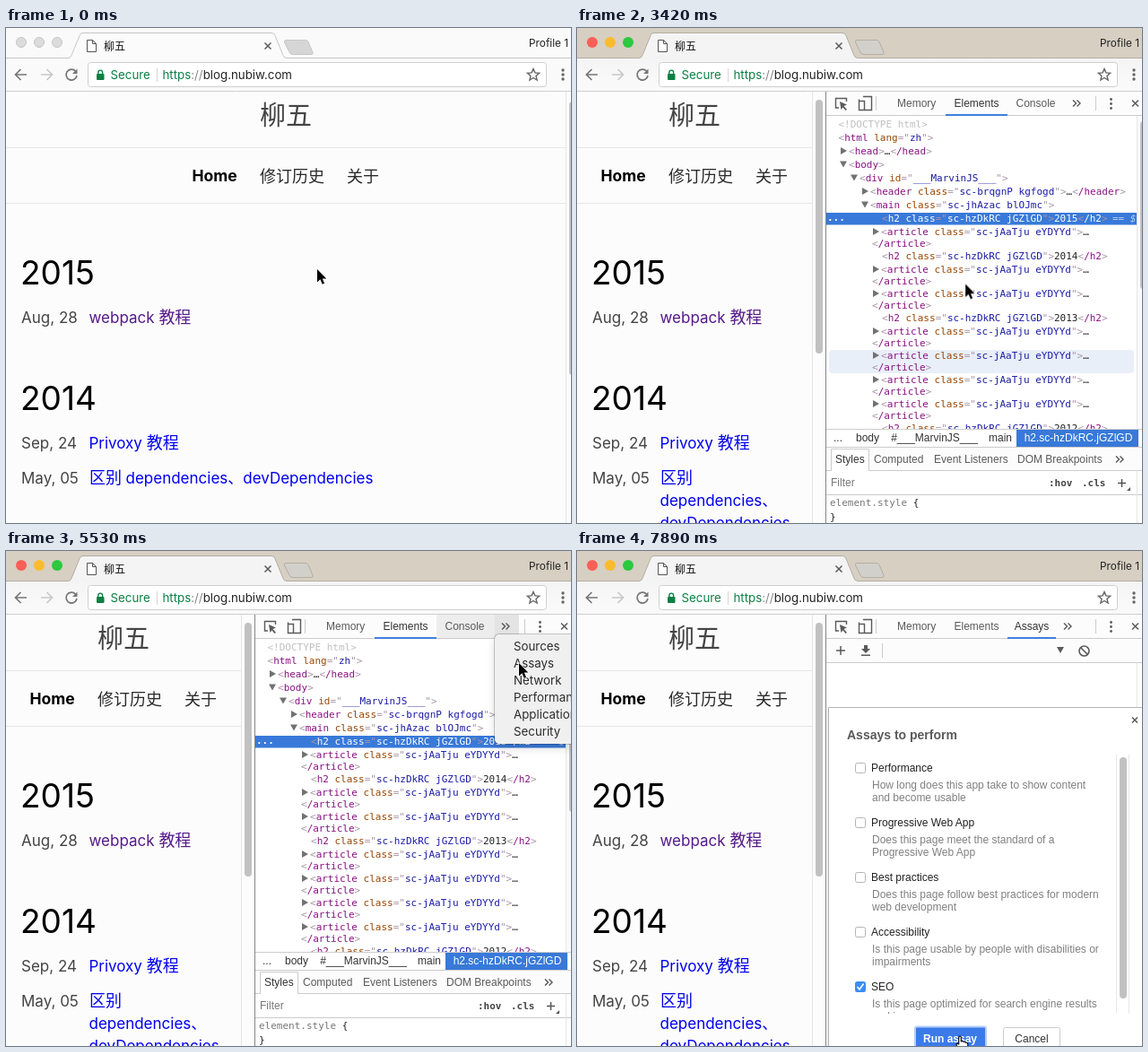
An HTML page that plays this animation: 630 by 552 pixels, repeating every 8000 ms.

```html
<!DOCTYPE html>
<html lang="zh-CN">
<head>
<meta charset="utf-8">
<title>Browser walkthrough</title>
<style>
html, body { margin: 0; width: 630px; height: 552px; overflow: hidden; background: #fcfcfc }
body { position: relative; font-family: Inter, "Noto Sans CJK SC", sans-serif }
svg { position: absolute; left: 0; top: 0 }
text { white-space: pre }
.mid { text-anchor: middle }
.ui { font-size: 13.3px }
.page { font-size: 17px; fill: #444 }
.page .big { font-size: 37px; fill: #000 }
.page .zh { font-size: 18px }
.page .nav { font-size: 18px; fill: #2a2a2a }
.page .logo { font-size: 29px }
.link { fill: #00e }
.seen { fill: #551a8b }
.rule { stroke: #e6e6e6 }
.dev { font: 12px "Liberation Sans", Arial, sans-serif; fill: #5a5a5a }
.dev .on { fill: #333 }
.code { font: 11px "DejaVu Sans Mono", monospace; fill: var(--mark, #a894a6) }
.t { fill: var(--tag, #881280) }
.a { fill: var(--attr, #994500) }
.v { fill: var(--val, #1a1aa6) }
.x { fill: var(--txt, #222) }
.sel { --mark: #dbe7fa; --tag: #fff; --attr: #fff; --val: #fff; --txt: #fff }
.b { font-weight: bold }

.menu { position: absolute; box-sizing: border-box; background: #f0f0f0; color: #2b2b2b; font-size: 13.3px; line-height: 19px; border-radius: 5px }
.menu p { margin: 0; padding-left: 21px; white-space: nowrap }
.menu hr { margin: 5px 0; height: 2px; border: 0; background: #dadada }
.menu .off { color: #b4b4b4 }
.menu .hot { position: absolute; inset: 0; box-sizing: border-box; background: #529bfc; color: #fff }
.menu .hot hr { background: none }
.ctx { left: 345px; top: 252px; width: 168px; height: 205px }
.ctx, .ctx .hot { padding: 5px 0 }
.ctx, .more { box-shadow: 0 0 0 1px rgba(0,0,0,.2), 0 5px 8px 2px rgba(0,0,0,.1) }
.more { left: 545px; top: 93px; width: 130px; height: 122px }
.more, .more .hot { padding: 4px 0 }

.active, .split, .hoverA, .hoverB, .audit, .dialog, .row, .ctx .hot, .more .hot, .arrow, .hand { animation: 8s step-end infinite }
.active { animation-name: active }
.split { animation-name: split }
.hoverA { animation-name: hoverA }
.hoverB { animation-name: hoverB }
.audit { animation-name: audit }
.dialog { animation-name: dialog }
.row { animation-name: row }
.arrow { animation-name: arrow }
.hand { animation-name: hand }
.ctx { animation: ctx 8s linear infinite }
.more { animation: more 8s linear infinite }
.ctx .hot { animation-name: ctxHot }
.more .hot { animation-name: moreHot }
.cursor { animation: move 8s linear infinite }

@keyframes active { 0% { opacity: 0 } 8.25%, 100% { opacity: 1 } }
@keyframes split { 0% { opacity: 0 } 38.37%, 100% { opacity: 1 } }
@keyframes hoverA { 0% { opacity: 0 } 47.5%, 100% { opacity: 1 } }
@keyframes hoverB { 0% { opacity: 0 } 51.5%, 100% { opacity: 1 } }
@keyframes audit { 0% { opacity: 0 } 70.5%, 100% { opacity: 1 } }
@keyframes dialog { 0% { opacity: 0 } 89.5%, 100% { opacity: 1 } }
@keyframes arrow { 0% { opacity: 1 } 85.6% { opacity: 0 } 89.1% { opacity: 1 } 96.9%, 100% { opacity: 0 } }
@keyframes hand { 0% { opacity: 0 } 85.6% { opacity: 1 } 89.1% { opacity: 0 } 96.9%, 100% { opacity: 1 } }
@keyframes row {
  0% { opacity: 0; transform: translateY(54px) }
  40.6% { opacity: 1; transform: translateY(54px) }
  41.6% { opacity: 1; transform: translateY(27px) }
  42.4% { opacity: 1; transform: none }
  43.3% { opacity: 1; transform: translateY(-69px) }
  44.2% { opacity: 1; transform: translateY(-96px) }
  45% { opacity: 1; transform: translateY(-138px) }
  45.8%, 100% { opacity: 0 }
}
@keyframes ctx { 0%, 15.74% { opacity: 0 } 15.75%, 32.5% { opacity: 1 } 35.5%, 100% { opacity: 0 } }
@keyframes ctxHot {
  0% { clip-path: inset(205px 0 0) }
  17.2% { clip-path: inset(43px 0 143px) }
  18% { clip-path: inset(74px 0 112px) }
  18.8% { clip-path: inset(93px 0 93px) }
  19.6% { clip-path: inset(112px 0 74px) }
  20.6% { clip-path: inset(131px 0 55px) }
  22.2% { clip-path: inset(162px 0 24px) }
  26.6% { clip-path: inset(181px 0 5px) }
  31.1% { clip-path: inset(205px 0 0) }
  31.9%, 100% { clip-path: inset(181px 0 5px) }
}
@keyframes more { 0%, 55.24% { opacity: 0 } 55.25% { opacity: .95 } 56%, 70% { opacity: 1 } 72%, 100% { opacity: 0 } }
@keyframes moreHot {
  0% { clip-path: inset(122px 0 0) }
  60.5% { clip-path: inset(4px 0 99px) }
  63.5% { clip-path: inset(23px 0 80px) }
  68.5% { clip-path: inset(122px 0 0) }
  69.2%, 100% { clip-path: inset(23px 0 80px) }
}
@keyframes move {
  0%, .74% { transform: translate(347px, 269px) }
  .75%, 12.5% { transform: translate(346px, 269px) }
  13.5%, 15.75% { transform: translate(342px, 258px) }
  20% { transform: translate(392px, 395px) }
  24.5%, 26.6% { transform: translate(402px, 436px) }
  27.4%, 38.6% { transform: translate(401px, 439px) }
  42.75% { transform: translate(433px, 286px) }
  47.9%, 49.2% { transform: translate(490px, 91px) }
  52.25%, 59.5% { transform: translate(557px, 89px) }
  64.75%, 76.4% { transform: translate(572px, 125px) }
  77.1%, 77.4% { transform: translate(556px, 159px) }
  86.5%, 90% { transform: translate(434px, 473px) }
  98%, 100% { transform: translate(427px, 541px) }
}
</style>
</head>
<body>
<svg width="630" height="552" viewBox="0 0 630 552">
  <defs>
    <linearGradient id="bar" x2="0" y2="1"><stop stop-color="#f4f4f4"/><stop offset=".7" stop-color="#f9f9f9"/></linearGradient>
    <path id="tab" d="M0 33.500H69Q72 33.500 73 30.500L82 8.500Q83 5.500 86 5.500H296Q299 5.500 300 8.500L309 30.500Q310 33.500 313 33.500H630"/>
    <path id="plusTab" d="M312 13.500H334Q336 13.500 337 15.500L342 27Q343 29.500 340 29.500H320Q317 29.500 316 27L310.500 16Q310 13.500 312 13.500Z"/>
    <path id="shut" d="M0-3.500 7 3.500M7-3.500 0 3.500" stroke="#5a5a5a" stroke-width="1.500"/>
    <path id="right" d="M0-4 7 0 0 4Z" fill="#727272"/>
    <path id="down" d="M0-3.500H8L4 3.500Z" fill="#727272"/>
    <path id="chev" d="M0-3.500 3.500 0 0 3.500M4.500-3.500 8 0 4.500 3.500" fill="none" stroke="#555" stroke-width="1.400"/>
    <g id="art">
      <use href="#right" x="330" y="-4"/>
      <text x="339">&lt;<tspan class="t">article</tspan> <tspan class="a">class</tspan>="<tspan class="v">sc-jAaTju eYDYYd</tspan>"&gt;<tspan class="x">…</tspan></text>
      <text x="329" y="13">&lt;<tspan class="t">/article</tspan>&gt;</text>
    </g>
    <g id="h2">
      <text x="340">&lt;<tspan class="t">h2</tspan> <tspan class="a">class</tspan>="<tspan class="v">sc-hzDkRC jGZlGD</tspan>"&gt;</text>
      <text x="558.500">&lt;<tspan class="t">/h2</tspan>&gt;</text>
    </g>
    <rect id="box" x="310.500" y="-5.500" width="11" height="11" rx="2" fill="#fff" stroke="#b5b5b5"/>
    <clipPath id="list"><path d="M281 225H601V516H281Z"/></clipPath>
  </defs>

  <!-- page, full width -->
  <g class="page">
    <path d="M0 133.500H624M0 195.500H624M624.500 71V552" class="rule"/>
    <rect x="628" y="82" width="7" height="305" rx="3.500" fill="#c1c1c1"/>
    <text x="312" y="108" class="mid logo">柳五</text>
    <text x="232.500" y="171" class="mid b" font-size="17.500" fill="#000">Home</text>
    <text x="283" y="171.500" class="nav">修订历史</text>
    <text x="380" y="171.500" class="nav">关于</text>
    <g id="posts">
      <text x="16" y="286" class="big">2015</text>
      <text x="17" y="329">Aug, 28</text>
      <text x="92.500" y="329" class="seen">webpack <tspan class="zh">教程</tspan></text>
      <text x="16" y="426" class="big">2014</text>
      <text x="17" y="469">Sep, 24</text>
      <text x="92.500" y="469" class="link">Privoxy <tspan class="zh">教程</tspan></text>
      <text x="17" y="508">May, 05</text>
      <text x="93" y="508" class="link zh">区别</text>
    </g>
    <text x="133.500" y="508" class="link">dependencies、devDependencies</text>
  </g>

  <!-- page beside the tools -->
  <g class="split">
    <rect y="71" width="630" height="481" fill="#fcfcfc"/>
    <g class="page">
      <path d="M0 133.500H262M0 195.500H262M262.500 71V552" class="rule"/>
      <rect x="266" y="80" width="8" height="283" rx="4" fill="#c1c1c1"/>
      <text x="131" y="108" class="mid logo">柳五</text>
      <text x="51.500" y="171" class="mid b" font-size="17.500" fill="#000">Home</text>
      <text x="102" y="171.500" class="nav">修订历史</text>
      <text x="199" y="171.500" class="nav">关于</text>
      <use href="#posts"/>
      <text x="92.500" y="533" class="link">dependencies、</text>
      <text x="92.500" y="558" class="link">devDependencies</text>
    </g>

    <g class="dev">
      <path d="M278 71H630V552H278Z" fill="#fff"/>
      <path d="M278 71H630V97H278Z" fill="#fcfcfc"/>
      <path class="hoverA" d="M480 71H545V97H480Z" fill="#ededed"/>
      <path class="hoverB" d="M545 71H572V97H545Z" fill="#e4e4e4"/>
      <path d="M278 97.500H630" stroke="#ccc"/>
      <g fill="none" stroke="#5a5a5a" stroke-width="1.400">
        <path d="M292 89H288.500V78.500H300.500V82M314.500 83V79.500M319 76.500H328.500V91.500H321M314.500 81.500H320.500V91.500H314.500Z"/>
        <path d="M293 82 301 85.500 297.500 87 301 91 299.500 92 296.500 88.500 294.500 91Z" fill="#5a5a5a" stroke="none"/>
        <path d="M333.500 76V92M578.500 76V92" stroke="#ccc" stroke-width="1"/>
      </g>
      <text x="357" y="88">Memory</text>
      <text x="420.500" y="88" class="on">Elements</text>
      <text x="489.500" y="88">Console</text>
      <use href="#chev" x="553" y="84"/>
      <path d="M411 96H480V98H411Z" fill="#3f7fe0"/>
      <g fill="#5a5a5a"><circle cx="595.500" cy="79.500" r="1.400"/><circle cx="595.500" cy="84.500" r="1.400"/><circle cx="595.500" cy="89.500" r="1.400"/></g>
      <use href="#shut" x="619" y="84"/>

      <g class="code">
        <rect class="row" x="281" y="359" width="340" height="26" rx="4" fill="#e9eff9"/>
        <path d="M278 206H624V219.500H278Z" fill="#3879d9"/>
        <text x="291.500" y="111" fill="#c0c0c0">&lt;!DOCTYPE html&gt;</text>
        <text x="291.500" y="126">&lt;<tspan class="t">html</tspan> <tspan class="a">lang</tspan>="<tspan class="v">zh</tspan>"&gt;</text>
        <use href="#right" x="294" y="137"/>
        <text x="303" y="141">&lt;<tspan class="t">head</tspan>&gt;<tspan class="x">…</tspan>&lt;<tspan class="t">/head</tspan>&gt;</text>
        <use href="#down" x="293" y="152"/>
        <text x="303" y="156">&lt;<tspan class="t">body</tspan>&gt;</text>
        <use href="#down" x="305" y="167"/>
        <text x="315" y="171">&lt;<tspan class="t">div</tspan> <tspan class="a">id</tspan>="<tspan class="v">___MarvinJS___</tspan>"&gt;</text>
        <use href="#right" x="318" y="182"/>
        <text x="327" y="186">&lt;<tspan class="t">header</tspan> <tspan class="a">class</tspan>="<tspan class="v">sc-brqgnP kgfogd</tspan>"&gt;<tspan class="x">…</tspan>&lt;<tspan class="t">/header</tspan>&gt;</text>
        <use href="#down" x="317" y="197"/>
        <text x="327" y="201">&lt;<tspan class="t">main</tspan> <tspan class="a">class</tspan>="<tspan class="v">sc-jhAzac blOJmc</tspan>"&gt;</text>
        <g class="sel">
          <text x="279" y="215" fill="#fff" class="b">...</text>
          <use href="#h2" y="216"/><text x="532" y="216" class="x">2015</text>
          <text x="597" y="216" font-style="italic" fill="#b9d0f4">== $0</text>
        </g>
        <use href="#art" y="231"/>
        <use href="#h2" y="258"/><text x="532" y="258" class="x">2014</text>
        <use href="#art" y="273"/>
        <use href="#art" y="300"/>
        <use href="#h2" y="327"/><text x="532" y="327" class="x">2013</text>
        <use href="#art" y="342"/>
        <use href="#art" y="369"/>
        <use href="#art" y="396"/>
        <use href="#art" y="423"/>
        <use href="#h2" y="450"/><text x="532" y="450" class="x">2012</text>
      </g>
      <path d="M624 98H630V447H624Z" fill="#fafafa"/>
      <path d="M624.500 98V447" class="rule"/>
      <rect x="628" y="104" width="7" height="187" rx="3.500" fill="#c1c1c1"/>

      <path d="M278 447H630V552H278Z" fill="#fff"/>
      <path d="M278 467H630V494H278Z" fill="#fcfcfc"/>
      <path d="M490 448H626V467H490Z" fill="#3879d9"/>
      <path d="M283.500 494V469.500H325.500V494" fill="#fff" stroke="#ccc"/>
      <path d="M278 447.500H630M278 467.500H630M278 493.500H283M326 493.500H630M278 520.500H630" stroke="#ccc"/>
      <path d="M624.500 494V552" class="rule"/>
      <g class="on">
        <text x="286" y="461">...</text><text x="311" y="461">body</text>
        <text x="398.500" y="461" class="mid">#___MarvinJS___</text><text x="459" y="461">main</text>
        <text x="288" y="485">Styles</text>
      </g>
      <text x="559" y="461" class="mid" fill="#fff">h2.sc-hzDkRC.jGZlGD</text>
      <text x="331" y="485">Computed</text>
      <text x="398" y="485">Event Listeners</text>
      <text x="491" y="485">DOM Breakpoints</text>
      <use href="#chev" x="601" y="481"/>
      <text x="283" y="511" fill="#777">Filter</text>
      <g class="code b" style="--mark:#444"><text x="526" y="511">:hov</text><text x="563" y="511">.cls</text></g>
      <path d="M603 507.500H612M607.500 503V512" stroke="#555" stroke-width="1.500"/><path d="M617 512V516H613Z" fill="#555"/>
      <text x="282" y="533" class="code"><tspan fill="#777">element.style</tspan> <tspan class="x">{</tspan></text>
      <text x="282" y="549" class="code"><tspan class="x">}</tspan></text>
    </g>

    <g class="audit dev">
      <path d="M410 71H574V97H410Z" fill="#fcfcfc"/>
      <path d="M278 97H630V125H278Z" fill="#fcfcfc"/>
      <path d="M278 125H630V552H278Z" fill="#fff"/>
      <path d="M278 97.500H630M278 124.500H630M340.500 103V119" stroke="#ccc"/>
      <path d="M624.500 125V538" class="rule"/>
      <path d="M480 96H534V98H480Z" fill="#3f7fe0"/>
      <text x="420.500" y="88">Elements</text>
      <text x="507" y="88" class="mid on">Assays</text>
      <use href="#chev" x="543" y="84"/>
      <path d="M289 111H299M294 106V116" stroke="#5a5a5a" stroke-width="1.500"/>
      <path d="M320 105H324V109H327L322 114 317 109H320ZM317 115.500H327V117H317Z"/>
      <path d="M535 107H543L539 114Z"/>
      <g fill="none" stroke="#5a5a5a" stroke-width="1.600"><circle cx="565.500" cy="111.500" r="5.500"/><path d="M561.500 107.500 569.500 115.500"/></g>
      <circle cx="451" cy="284" r="54" fill="#304ffe"/>
      <g font-size="12.200">
        <text x="328" y="397"><tspan class="b">Assays</tspan> help you identify and fix common</text>
        <text x="328" y="411">problems that affect your site's performance,</text>
        <text x="328" y="425">accessibility, and user experience. <tspan fill="#15c" text-decoration="underline">Learn</tspan></text>
        <text x="328" y="439" fill="#15c" text-decoration="underline">more</text>
      </g>
      <rect x="386" y="461" width="130.500" height="27" rx="2" fill="#3b7ae8" stroke="#b4cff8" stroke-width="2"/>
      <text x="451" y="479" class="mid b" fill="#fff">Perform an assay…</text>
    </g>

    <g class="dialog dev">
      <path d="M279 175H281V552H279Z" fill="#e4e4e4"/>
      <path d="M280.500 560V174.500H640V560Z" fill="#fff" stroke="#b5b5b5"/>
      <path d="M619 185.500 625 191.500M625 185.500 619 191.500" stroke="#5a5a5a" stroke-width="1.500"/>
      <text x="301" y="210" class="b" font-size="14">Assays to perform</text>
      <g clip-path="url(#list)">
        <g fill="#222">
          <text x="328" y="246">Performance</text><text x="328" y="307">Progressive Web App</text>
          <text x="328" y="368">Best practices</text><text x="328" y="429">Accessibility</text><text x="328" y="490">SEO</text>
        </g>
        <g fill="#808080">
          <text x="329" y="265">How long does this app take to show content</text><text x="329" y="279">and become usable</text>
          <text x="329" y="326">Does this page meet the standard of a</text><text x="329" y="340">Progressive Web App</text>
          <text x="329" y="387">Does this page follow best practices for modern</text><text x="329" y="401">web development</text>
          <text x="329" y="448">Is this page usable by people with disabilities or</text><text x="329" y="462">impairments</text>
          <text x="329" y="509">Is this page optimized for search engine results</text><text x="329" y="523">ranking</text>
        </g>
        <use href="#box" y="242"/><use href="#box" y="303"/><use href="#box" y="364"/><use href="#box" y="425"/>
        <rect x="310" y="480" width="12" height="12" rx="2.500" fill="#3b8df5"/>
        <path d="M312.500 486 315 489 319.500 482.500" fill="none" stroke="#fff" stroke-width="1.600"/>
      </g>
      <path d="M601.500 227V516M615.500 227V516" class="rule"/>
      <rect x="605" y="230" width="8" height="269" rx="4" fill="#c1c1c1"/>
      <rect x="377" y="530.500" width="79" height="27" rx="2" fill="#3b7ae8" stroke="#b4cff8" stroke-width="2"/>
      <text x="416" y="548" class="mid b" fill="#fff">Run assay</text>
      <rect x="475.500" y="531.500" width="63" height="27" rx="2" fill="#fff" stroke="#ccc"/>
      <text x="507" y="548" class="mid on">Cancel</text>
    </g>
    <path d="M277.500 71V552" stroke="#858585"/>
  </g>

  <!-- window frame -->
  <path d="M0 0H630V70H0Z" fill="#fafafa"/>
  <g stroke="#c6c6c6">
    <use href="#tab" fill="#fbfbfb"/><use href="#plusTab" fill="#d6d6d6"/>
    <g fill="#dcdcdc"><circle cx="17" cy="16" r="5.500"/><circle cx="37" cy="16" r="5.500"/><circle cx="57" cy="16" r="5.500"/></g>
  </g>
  <g class="active">
    <path d="M0 0H630V34H0Z" fill="#d6cfc2"/>
    <path d="M0 33H630V70H0Z" fill="url(#bar)"/>
    <g stroke="#b3ada2"><use href="#tab" fill="#f4f4f4"/><use href="#plusTab" fill="#d2d0cb"/></g>
    <circle cx="17" cy="16" r="6" fill="#fb5f57"/><circle cx="37" cy="16" r="6" fill="#fcbb2e"/><circle cx="57" cy="16" r="6" fill="#2bc840"/>
  </g>
  <path d="M0 70.500H630" stroke="#d0d0d0"/>
  <path d="M90.500 13.500H96.500L100.500 17.500V26.500H90.500ZM96.500 13.500V17.500H100.500" fill="#fff" stroke="#555"/>
  <text x="109" y="24.500" font-size="12" fill="#111">柳五</text>
  <use href="#shut" x="288.500" y="20"/>
  <text x="627" y="21" font-size="11.800" fill="#222" text-anchor="end">Profile 1</text>
  <g fill="none" stroke="#767676" stroke-width="1.700">
    <path d="M23 52H11M16.500 46 10.500 52 16.500 58"/>
    <path d="M39 52H51M45.500 46 51.500 52 45.500 58" stroke="#c8c8c8"/>
    <path d="M77.500 48A6 6 0 1 0 79 53"/>
  </g>
  <path d="M79.500 45.500V51H74Z" fill="#767676"/>
  <rect x="91.500" y="38.500" width="511" height="27" rx="3" fill="#fff" stroke="#cfcfcf"/>
  <rect x="101" y="51" width="8.500" height="7" rx="1" fill="#0b8043"/>
  <path d="M102.800 51.500V49.500A2.400 2.400 0 0 1 107.600 49.500V51.500" fill="none" stroke="#0b8043" stroke-width="1.400"/>
  <path d="M168.500 45V60" stroke="#d5d5d5"/>
  <g class="ui">
    <text x="116.500" y="57" fill="#0b8043">Secure</text>
    <text x="174.500" y="57" fill="#222"><tspan fill="#0b8043">https</tspan><tspan fill="#888">://</tspan>blog.nubiw.com</text>
  </g>
  <path d="M588 45.500 589.900 49.900 594.600 50.300 591 53.400 592.100 58 588 55.500 583.900 58 585 53.400 581.400 50.300 586.100 49.900Z" fill="none" stroke="#666" stroke-width="1.400"/>
  <g fill="#666"><circle cx="621" cy="47" r="1.700"/><circle cx="621" cy="52" r="1.700"/><circle cx="621" cy="57" r="1.700"/></g>
</svg>

<div class="menu ctx">
  <p>Back<p class="off">Forward<p>Reload<hr><p>Save As...<p>Print...<p>Cast...<p>Translate to English<hr><p>View Page Source<p>Inspect</p>
  <div class="hot"><p>Back<p>Forward<p>Reload<hr><p>Save As...<p>Print...<p>Cast...<p>Translate to English<hr><p>View Page Source<p>Inspect</p></div>
</div>

<div class="menu more">
  <p>Sources<p>Assays<p>Network<p>Performance<p>Application<p>Security</p>
  <div class="hot"><p>Sources<p>Assays<p>Network<p>Performance<p>Application<p>Security</p></div>
</div>

<svg width="630" height="552" viewBox="0 0 630 552">
  <g class="cursor" stroke-linejoin="round">
    <path class="arrow" d="M0 0V14.500L3.400 11.300 5.700 16.800 8 15.800 5.800 10.600H10.300Z" fill="#000" stroke="#fff" stroke-width="1.500" paint-order="stroke"/>
    <path class="hand" d="M-1.300 9V1.500Q-1.300 0 0 0T1.300 1.500V6Q3.500 4.800 4 6.500 6 5.700 6.500 7.300 8.800 6.800 8.800 9V11.500L7.300 16H.3L-3.800 10.300Q-4.300 8.300-2.700 8Z" fill="#fff" stroke="#000" stroke-width="1.100"/>
  </g>
</svg>
</body>
</html>
```
